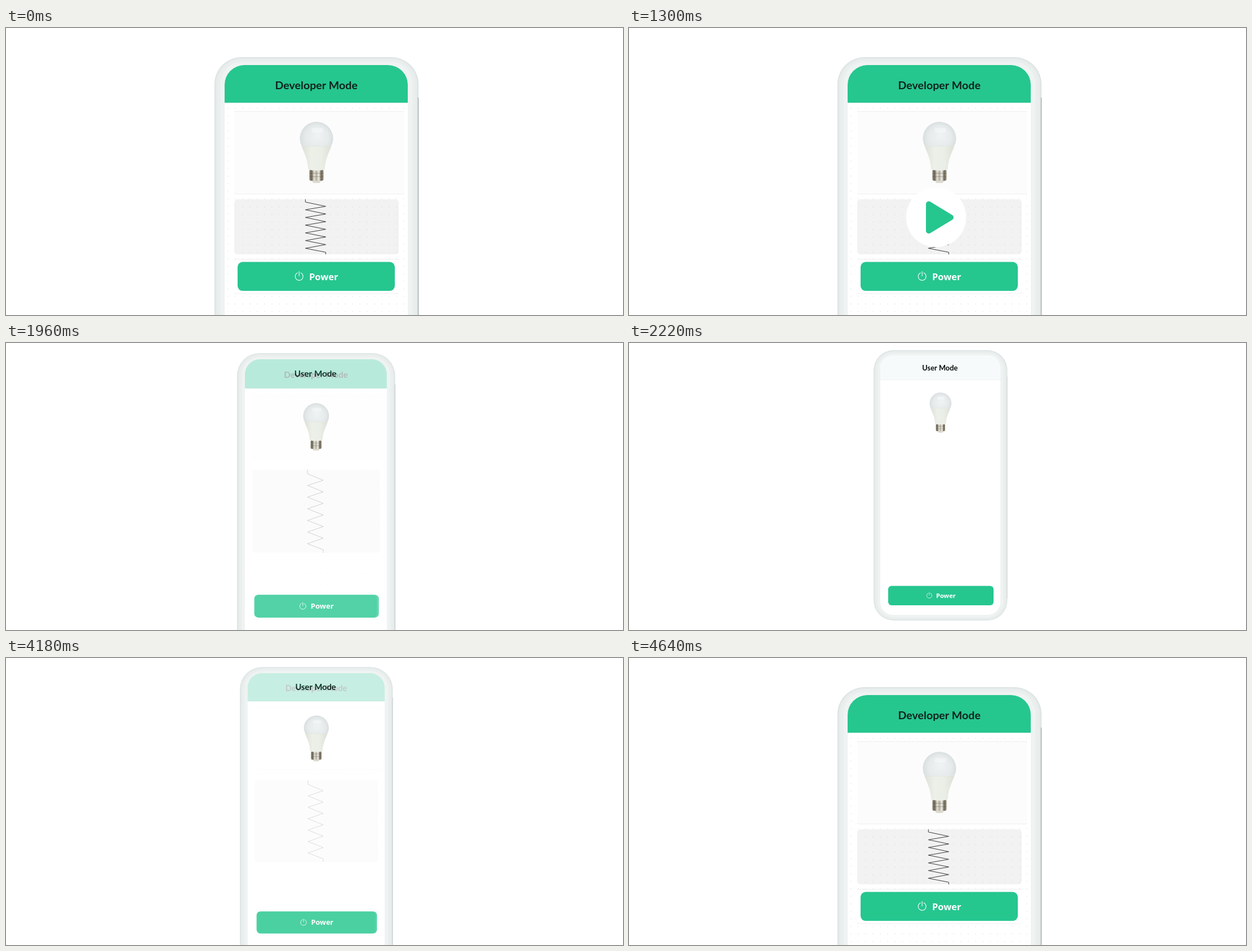
An HTML page with a canvas that plays this animation: 1095x511 px, repeating every 5.4 s.

```html
<!DOCTYPE html>
<html lang="en">
<head>
<meta charset="utf-8">
<title>Developer Mode and User Mode</title>
<style>
  html, body { margin: 0; width: 100%; height: 100%; overflow: hidden; background: #fff; }
  canvas { display: block; width: 1095px; height: 511px; }
</style>
</head>
<body>
<canvas id="stage" width="1095" height="511"></canvas>
<script>
const W = 1095, H = 511, LOOP = 5400;
const GREEN = '#26c68f';
// Screen size in the zoomed-in pose; phone parts are drawn in these units.
const SCREEN = 325, SCREEN_H = 705;

let ctx = document.getElementById('stage').getContext('2d');
const buffer = document.createElement('canvas');
buffer.width = W;
buffer.height = H;
const bufferCtx = buffer.getContext('2d');

const lerp = (a, b, t) => a + (b - a) * t;
const ramp = (t, start, end) => Math.min(1, Math.max(0, (t - start) / (end - start)));
const sine = x => (1 - Math.cos(Math.PI * x)) / 2;
const ease = x => 0.85 * sine(x) + 0.15 * x;

// Draws into a buffer first, so that the parts fade as one flat picture.
function group(alpha, draw) {
  if (alpha <= 0) return;
  const target = ctx;
  bufferCtx.resetTransform();
  bufferCtx.clearRect(0, 0, W, H);
  bufferCtx.setTransform(target.getTransform());
  ctx = bufferCtx;
  draw();
  ctx = target;
  ctx.save();
  ctx.resetTransform();
  ctx.globalAlpha = alpha;
  ctx.drawImage(buffer, 0, 0);
  ctx.restore();
}

function box(x, y, w, h, r, fill) {
  ctx.beginPath();
  ctx.roundRect(x, y, w, h, r);
  ctx.fillStyle = fill;
  ctx.fill();
}

function polyline(points, color, width) {
  ctx.beginPath();
  points.forEach(([x, y]) => ctx.lineTo(x, y));
  ctx.strokeStyle = color;
  ctx.lineWidth = width;
  ctx.stroke();
}

function label(text, x, y, font, color, align) {
  ctx.font = font;
  ctx.textAlign = align;
  ctx.fillStyle = color;
  ctx.fillText(text, x, y);
}

function title(text, x, y, color) {
  label(text, x, y, '700 19.6px Lato, sans-serif', color, 'center');
}

function shade(x0, y0, x1, y1, ...colors) {
  const g = ctx.createLinearGradient(x0, y0, x1, y1);
  colors.forEach((c, i) => g.addColorStop(i / (colors.length - 1), c));
  return g;
}

const goesBack = t => t >= 3980;

// 0 in developer mode, 1 in user mode
function progress(t) {
  return goesBack(t) ? 1 - ease(ramp(t, 3990, 4613)) : ease(ramp(t, 1525, 2205));
}

function pose(t) {
  const p = progress(t);
  // The zoom trails the move slightly, which gives the small drift.
  const zoom = p - (goesBack(t) ? 0.25 * p : 0.5 * p ** 3) * (1 - p);
  const width = lerp(SCREEN, 213, zoom);
  return {
    p,
    buttonP: progress(t - 6),
    scale: width / SCREEN,
    left: lerp(661, 624.9, p) - 0.84 * width,
    top: lerp(420.25, 254.2, p) - 1.09 * width
  };
}

function frame(p) {
  const r = lerp(48, 54, p);
  const rings = [[0, '#d9e0e0'], [1.5, '#e5ebea'], [5, '#eaefee'], [11, '#eff3f2']];
  for (const [inset, color] of rings) {
    box(-18 + inset, -14 + inset * 0.8, 362 - 2 * inset, 734 - 1.6 * inset, r - inset, color);
  }
  group(1 - 0.65 * p, () => polyline([[343.6, 58], [343.6, 660]], '#8f9695', 1));
}

function userScreen() {
  box(0, 0, SCREEN, SCREEN_H, 0, '#fff');
  box(0, 0, SCREEN, 67, 0, '#f7fafb');
  box(0, 66, SCREEN, 1.5, 0, '#edf2f2');
  title('User Mode', 161.5, 40.5, '#07100d');
}

function dots() {
  ctx.fillStyle = '#d9dddd';
  for (let x = 6; x < SCREEN; x += 13) {
    for (let y = 77; y < 560; y += 13.4) ctx.fillRect(x - 0.6, y - 0.6, 1.2, 1.2);
  }
}

function card(x, y, w, h, fill) {
  box(x, y, w, h, 2, '#eeeeee');
  box(x, y + 1, w, h - 2, 2, fill);
}

function graph(p) {
  const x = 17, y = 239 + 20.8 * p, w = 292;
  const h = 98 + SCREEN * 0.4215 * p / (0.33 + p);
  box(x, y, w, h, 6, '#f2f2f2');
  ctx.fillStyle = '#d3d7d7';
  for (let dx = 15; dx < w; dx += 13) {
    for (let k = 0; k < 7; k++) {
      ctx.fillRect(x + dx - 0.6, y + h * (0.14 + 0.137 * k) - 0.6, 1.2, 1.2);
    }
  }
  const points = [[143.3, y]];
  for (let k = 0; k < 7; k++) {
    points.push([143.3, y + h * (0.05 + 0.14 * k)], [179.5, y + h * (0.128 + 0.139 * k)]);
  }
  points.push([179.5, y + h]);
  polyline(points, '#383a3a', 1);
}

function developerScreen(p, buttonY) {
  dots();
  card(17, 82, 302, 148, '#fcfcfc');
  graph(p);
  card(17, buttonY - 31, 292, 62, '#fff');
  box(0, 0, SCREEN, 67, 0, GREEN);
  title('Developer Mode', 162.7, 42.5, '#10231c');
}

function bulb() {
  ctx.save();
  ctx.translate(163, 155);
  // Metal base
  box(-7.5, 47, 15, 8, 4, '#dcdad0');
  box(-12.5, 31, 25, 20, 3,
    shade(-12.5, 0, 12.5, 0, '#8a8474', '#6f6959', '#e6e3d9', '#b5af9f', '#f3f1ea', '#6f6959', '#9a9484'));
  for (const y of [37, 43]) box(-12.5, y, 25, 1.2, 1, 'rgba(80,74,60,.3)');
  // Body
  ctx.beginPath();
  ctx.moveTo(-26.5, -11);
  ctx.bezierCurveTo(-22, 2, -16, 10, -14.5, 31);
  ctx.quadraticCurveTo(0, 35, 14.5, 31);
  ctx.bezierCurveTo(16, 10, 22, 2, 26.5, -11);
  ctx.closePath();
  ctx.fillStyle = shade(-26, 0, 26, 0, '#dde2d8', '#edf0e8', '#ebeee6', '#dce1d7');
  ctx.fill();
  // Globe
  ctx.beginPath();
  ctx.arc(0, -24.5, 29.5, Math.PI - 0.46, 0.46);
  ctx.closePath();
  const glow = ctx.createRadialGradient(2, -30, 3, 0, -24.5, 30);
  glow.addColorStop(0, '#eef2f2');
  glow.addColorStop(0.65, '#e6eaeb');
  glow.addColorStop(1, '#d8dedf');
  ctx.fillStyle = glow;
  ctx.fill();
  box(-9, -43, 21, 8, 4, 'rgba(255,255,255,.35)');
  polyline([[-26.5, -11], [26.5, -11]], '#d9dedb', 0.8);
  ctx.restore();
}

function powerLabel(y, p) {
  const x = lerp(132.2, 132.8, p);
  ctx.strokeStyle = '#fff';
  ctx.lineWidth = 1.1;
  ctx.beginPath();
  ctx.arc(x, y, 7, -1.2, Math.PI + 1.2);
  ctx.stroke();
  polyline([[x, y - 9], [x, y - 0.5]], '#fff', 1.1);
  const size = lerp(16.5, 17, p);
  label('Power', lerp(150, 151, p), y + 6.2, `600 ${size}px "Noto Sans", "Open Sans", sans-serif`, '#fff', 'left');
}

function button(y, p) {
  const h = lerp(51.5, 52.7, p);
  group(p, () => box(21.4, y - h / 2, 285.3, h, 9, GREEN));
  group(1 - p, () => box(23, y - h / 2, 279, h, 9, GREEN));
  powerLabel(y, p);
}

function phone({ p, buttonP, scale, left, top }) {
  const buttonY = lerp(376.3, 652.5, buttonP);
  ctx.save();
  ctx.translate(left, top);
  ctx.scale(scale, scale);
  frame(p);
  ctx.beginPath();
  ctx.roundRect(0, 0, SCREEN, SCREEN_H, 35);
  ctx.clip();
  userScreen();
  group(1 - p, () => developerScreen(p, buttonY));
  bulb();
  button(buttonY, p);
  ctx.restore();
}

function playButton() {
  ctx.beginPath();
  ctx.arc(545, 337, 53.3, 0, 2 * Math.PI);
  ctx.fillStyle = '#fff';
  ctx.fill();
  ctx.save();
  ctx.beginPath();
  ctx.moveTo(532, 313.5);
  ctx.lineTo(532, 361);
  ctx.lineTo(571, 337.2);
  ctx.closePath();
  ctx.fillStyle = ctx.strokeStyle = GREEN;
  ctx.lineWidth = 10;
  ctx.lineJoin = 'round';
  ctx.fill();
  ctx.stroke();
  ctx.restore();
}

function render(t) {
  ctx.fillStyle = '#fff';
  ctx.fillRect(0, 0, W, H);
  phone(pose(t));
  group(sine(ramp(t, 400, 1300)) * (1 - ramp(t, 1410, 1530)), playButton);
}

const start = performance.now();
function tick() {
  render((performance.now() - start) % LOOP);
  requestAnimationFrame(tick);
}
render(0);
requestAnimationFrame(tick);
</script>
</body>
</html>
```
